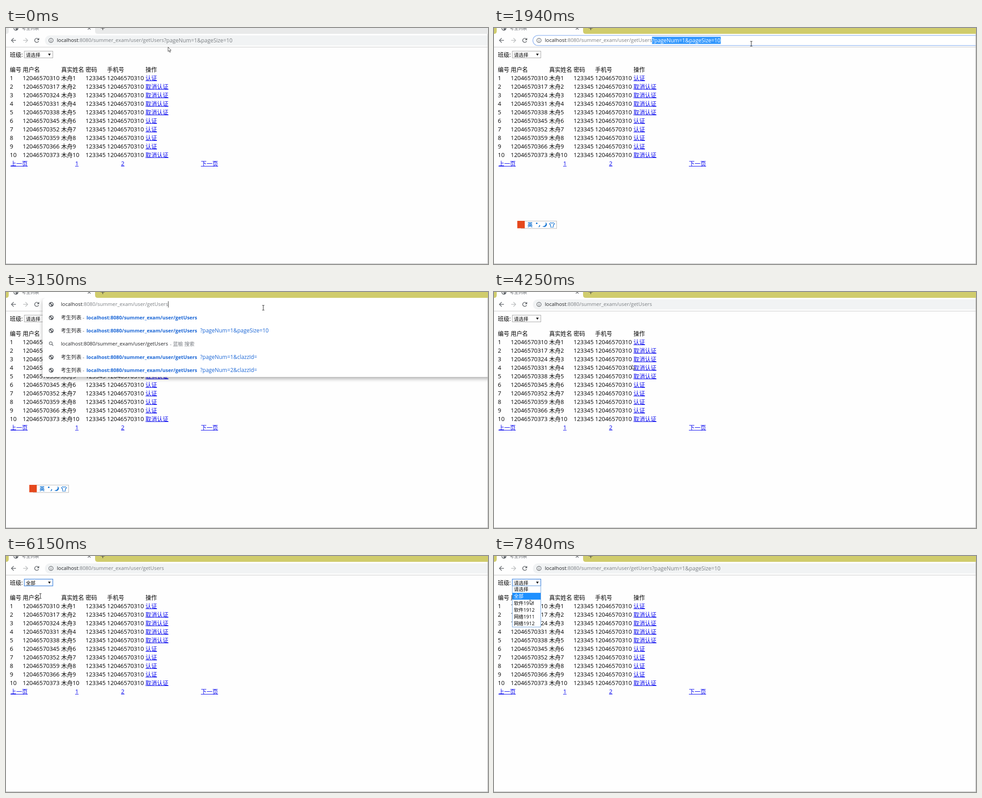
These frames come from a looping animation (1066 by 525 pixels, 8000 ms). An HTML page with a canvas:

```html
<!DOCTYPE html>
<html lang="zh-CN">
<head>
<meta charset="utf-8">
<title>考生列表</title>
<style>
html, body { margin: 0; width: 100%; height: 100%; overflow: hidden; background: #fefefe; }
canvas { display: block; }
</style>
</head>
<body>
<canvas id="stage" width="1066" height="525"></canvas>
<script>
const W = 1066, H = 525, LOOP = 8000;
const ctx = document.getElementById('stage').getContext('2d');
const GREY = '#5f6368', LINK = '#0000ee', BLUE = '#1a66d6', PAPER = '#fefefe';
const HOST = 'localhost', PATH = ':8080/summer_exam/user/getUsers';
const QUERY = '?pageNum=1&pageSize=10';
const OPTIONS = ['请选择', '全部', '软件1911', '软件1912', '网络1911', '网络1912'];
const CANCEL_ROWS = [2, 3, 4, 5, 10];

// Bursts of screen updates: start, end, number of steps.
const BURSTS = [[120, 820, 6], [1120, 1940, 7], [3030, 3150, 2], [3420, 3420, 1], [3980, 4940, 8],
  [5100, 5870, 6], [6150, 6300, 2], [6610, 7540, 8], [7690, 7840, 2]];

// Pointer path: time, x, y.
const POINTER = [[0, 358, 42], [120, 354, 38], [480, 323, 22], [820, 348, 21], [1120, 350, 24],
  [1257, 350, 24], [1800, 560, 35], [1940, 569, 35], [3420, 569, 35], [3980, 500, 85],
  [4117, 400, 140], [4254, 305, 162], [4391, 240, 173], [4800, 80, 85], [4940, 88, 60],
  [5100, 88, 60], [5870, 76, 89], [6300, 76, 89], [7400, 86, 61], [7540, 85, 62],
  [7690, 82, 79], [7840, 79, 97]];

function snap(t) {
  let held = 0;
  for (const [start, end, count] of BURSTS) {
    if (t < start) break;
    const step = (end - start) / (count - 1) || 1;
    held = Math.min(end, start + step * Math.floor((t - start) / step + 0.05));
  }
  return held;
}

function pointerAt(t) {
  const i = POINTER.findIndex(k => k[0] > t);
  if (i < 0) return POINTER[POINTER.length - 1].slice(1);
  const [a, b] = [POINTER[i - 1], POINTER[i]];
  const p = (t - a[0]) / (b[0] - a[0]);
  return [a[1] + (b[1] - a[1]) * p, a[2] + (b[2] - a[2]) * p];
}

function rect(x, y, w, h, color) {
  ctx.fillStyle = color;
  ctx.fillRect(x, y, w, h);
}

function circle(x, y, r, color) {
  ctx.fillStyle = color;
  ctx.beginPath();
  ctx.arc(x, y, r, 0, 7);
  ctx.fill();
}

function trace(points, closed) {
  ctx.beginPath();
  points.forEach(([x, y]) => ctx.lineTo(x, y));
  if (closed) ctx.closePath();
}

function line(points, color, width = 1) {
  ctx.strokeStyle = color;
  ctx.lineWidth = width;
  trace(points);
  ctx.stroke();
}

// Draws mixed text around the middle line y and returns its width.
function text(str, x, y, size = 12.7, color = '#000', weight = 400) {
  const start = x;
  ctx.fillStyle = color;
  for (const run of str.match(/[\u2e80-\u9fff]+|[^\u2e80-\u9fff]+/g)) {
    const cjk = run > '\u2e80';
    ctx.font = cjk ? `${weight} ${size}px "Noto Sans CJK SC", "Noto Sans CJK", sans-serif`
      : `${weight} ${size * 1.02}px "Open Sans", sans-serif`;
    ctx.fillText(run, x, y + size * 0.36);
    x += ctx.measureText(run).width;
  }
  return x - start;
}

function link(str, x, y) {
  const w = text(str, x, y, 12.7, LINK);
  rect(x, Math.round(y + 5.6), w, 1, LINK);
}

function globe(x, y) {
  circle(x, y, 5.3, GREY);
  ctx.fillStyle = '#fff';
  trace([[x - 4, y - 1], [x - 1, y], [x, y + 2], [x - 1, y + 4], [x - 3.5, y + 2]], true);
  ctx.fill();
  trace([[x, y - 3.8], [x + 3, y - 2.5], [x + 3.5, y + 1], [x + 1, y], [x + 1, y - 1.5], [x - 1, y - 2]], true);
  ctx.fill();
}

function tabStrip(active) {
  rect(0, 0, W, 13, active ? '#d0cc6c' : '#e9eaea');
  ctx.fillStyle = PAPER;
  ctx.beginPath();
  ctx.moveTo(0, 13);
  ctx.quadraticCurveTo(6, 13, 6, 7);
  ctx.lineTo(6, 0);
  ctx.lineTo(197, 0);
  ctx.lineTo(197, 7);
  ctx.quadraticCurveTo(197, 13, 203, 13);
  ctx.fill();
  globe(22, 0.5);
  text('考生列表', 35, 0.5, 9.5, GREY);
  line([[181, -2.5], [187, 3.5]], GREY, 1.2);
  line([[187, -2.5], [181, 3.5]], GREY, 1.2);
  line([[209.5, 0], [218.5, 0]], '#444', 1.4);
  line([[214, -5], [214, 4.5]], '#444', 1.4);
}

function arrowIcon(x, dir, color) {
  line([[x - 5 * dir, 27.5], [x + 5 * dir, 27.5]], color, 1.4);
  line([[x, 22.5], [x + 5 * dir, 27.5], [x, 32.5]], color, 1.4);
}

function toolbar() {
  rect(0, 13, W, 29, PAPER);
  rect(0, 42, W, 1, '#c9c9c9');
  arrowIcon(17, -1, GREY);
  arrowIcon(43, 1, '#babcbe');
  ctx.strokeStyle = GREY;
  ctx.lineWidth = 1.5;
  ctx.beginPath();
  ctx.arc(68, 27.5, 4.5, 0.4, 5.5);
  ctx.stroke();
  ctx.fillStyle = GREY;
  trace([[73.3, 22], [73.3, 27], [68.3, 27]], true);
  ctx.fill();
}

function address(x, y, query) {
  const w = text(HOST, x, y, 11.1, '#202124');
  text(PATH, x + w, y, 11.1, '#7b7f83');
  if (query) text(QUERY, x + 237, y, 11.7, '#7b7f83');
}

function pill({ focused, hovered, query, selectTo, caret }) {
  ctx.beginPath();
  ctx.roundRect(86, 16.5, 1020, 22.5, 11.25);
  ctx.fillStyle = focused ? '#fff' : hovered ? '#e8eaed' : '#f1f3f4';
  ctx.fill();
  if (focused) {
    ctx.strokeStyle = '#9dbdf2';
    ctx.lineWidth = 1.6;
    ctx.stroke();
  }
  ctx.strokeStyle = GREY;
  ctx.lineWidth = 1.2;
  ctx.beginPath();
  ctx.arc(99.5, 27.5, 4.7, 0, 7);
  ctx.stroke();
  rect(98.9, 27, 1.2, 3.2, GREY);
  rect(98.9, 24.7, 1.2, 1.2, GREY);
  address(112.5, 27.5, query);
  if (selectTo > 350) {
    ctx.save();
    ctx.beginPath();
    ctx.rect(349.5, 19.5, selectTo - 349.5, 16);
    ctx.clip();
    rect(349, 19, 153, 17, '#3297fd');
    text(QUERY, 349.5, 27.5, 11.7, '#fff');
    ctx.restore();
  }
  if (caret) rect(350, 20.5, 1, 14, '#333');
}

function page() {
  rect(0, 43, W, H - 43, PAPER);
  text('班级:', 8.5, 59.5);
  const columns = [8.5, 37, 122, 176, 223.5, 308.5];
  const row = (cells, y) => cells.forEach((cell, i) => text(cell, columns[i], y));
  row(['编号', '用户名', '真实姓名', '密码', '手机号', '操作'], 92.5);
  for (let n = 1; n <= 10; n++) {
    const y = 92.5 + 19 * n;
    row([`${n}`, `12046570${303 + n * 7}`, `木舟${n}`, '123345', '12046570310'], y);
    link(CANCEL_ROWS.includes(n) ? '取消认证' : '认证', columns[5], y);
  }
  link('上一页', 10, 301.5);
  link('1', 153, 301.5);
  link('2', 254.5, 301.5);
  link('下一页', 431, 301.5);
}

function select(value, focused) {
  rect(40, 51, 64, 16, '#fff');
  ctx.strokeStyle = focused ? '#4a8be0' : '#a3a3a3';
  ctx.lineWidth = focused ? 1.4 : 1;
  ctx.strokeRect(40.5, 51.5, 63, 15);
  text(value, 44, 60, 10.6);
  ctx.fillStyle = '#000';
  trace([[93.2, 57], [98.8, 57], [96, 61.8]], true);
  ctx.fill();
}

function optionList(active) {
  rect(40, 66, 64, 92.5, '#fff');
  OPTIONS.forEach((name, i) => {
    const y = 66.7 + 15.2 * i;
    if (i === active) rect(41, y, 62.5, 15.2, '#1e90ff');
    text(name, 44, y + 7.6, 10.6, i === active ? '#fff' : '#000');
  });
  ctx.strokeStyle = '#6fa3df';
  ctx.lineWidth = 1;
  ctx.strokeRect(40.5, 66.5, 63, 91.5);
}

function suggestions() {
  ctx.save();
  ctx.shadowColor = 'rgba(0,0,0,.32)';
  ctx.shadowBlur = 9;
  ctx.shadowOffsetY = 4;
  ctx.fillStyle = '#fff';
  ctx.beginPath();
  ctx.rect(0, 13, W, 200);
  ctx.clip();
  ctx.beginPath();
  ctx.roundRect(81, 13, 1020, 176, [7, 0, 0, 0]);
  ctx.fill();
  ctx.restore();

  globe(100, 27.5);
  address(121.5, 27.5, false);
  rect(358.5, 20.5, 1, 14, '#333');
  const rows = [[57, ''], [86, QUERY], [145, '?pageNum=1&clazzId='], [174, '?pageNum=2&clazzId=']];
  for (const [y, query] of rows) {
    globe(100, y);
    text('考生列表', 121.5, y, 11.3, '#202124');
    text('-', 169.5, y, 11.3, GREY);
    text(HOST + PATH, 178, y, 10.8, BLUE, 700);
    if (query) text(query, 429.5, y, 11.7, BLUE);
  }
  ctx.strokeStyle = GREY;
  ctx.lineWidth = 1.3;
  ctx.beginPath();
  ctx.arc(99, 114, 3.2, 0, 7);
  ctx.stroke();
  line([[101.3, 116.3], [104.5, 119.5]], GREY, 1.4);
  text(HOST + PATH, 121.5, 115.5, 11.1, '#202124');
  text('- 蓝榆 搜索', 362.5, 115.5, 11.2, '#777b80');
}

function inputBar() {
  const ink = '#1976d2';
  rect(60, 429, 79, 17.5, '#fff');
  ctx.strokeStyle = '#b5b5b5';
  ctx.lineWidth = 1;
  ctx.strokeRect(60.5, 429.5, 78, 16.5);
  rect(51.5, 429, 16.5, 16.5, '#e5481d');
  text('英', 74, 437.7, 11.5, ink, 700);
  circle(94.5, 434.5, 1.8, ink);
  line([[100.8, 438.5], [101, 440.5], [99, 442.8]], ink, 1.7);
  ctx.fillStyle = ink;
  ctx.beginPath();
  ctx.moveTo(114, 432);
  ctx.bezierCurveTo(121, 437, 114, 446.5, 107, 441);
  ctx.bezierCurveTo(113, 441.5, 115.5, 437, 114, 432);
  ctx.fill();
  ctx.strokeStyle = ink;
  ctx.lineWidth = 1.2;
  trace([[126, 433], [128.2, 434.5], [130.5, 433], [134, 435.5], [132.2, 438], [131.2, 437.5],
    [131.2, 443], [125.3, 443], [125.3, 437.5], [124.2, 438], [122.5, 435.5]], true);
  ctx.stroke();
}

function pointer(x, y, beam) {
  ctx.save();
  ctx.translate(x, y);
  if (beam) {
    line([[0, -5], [0, 5]], '#333', 1.1);
    line([[-2.5, -5.3], [2.5, -5.3]], '#333');
    line([[-2.5, 5.3], [2.5, 5.3]], '#333');
  } else {
    trace([[0.4, 0.4], [0.4, 10.2], [2.6, 8.2], [4.2, 12], [5.8, 11.3], [4.2, 7.7], [7.2, 7.7]], true);
    ctx.fillStyle = '#fff';
    ctx.fill();
    ctx.strokeStyle = '#333';
    ctx.lineWidth = 0.9;
    ctx.stroke();
  }
  ctx.restore();
}

function draw(time) {
  const t = snap(time);
  const within = (a, b) => t >= a && t < b;
  const [px, py] = pointerAt(t);
  const listOpen = within(5100, 6150) || t >= 7500;
  const chosen = within(6150, 6300);

  page();
  tabStrip(t >= 1200);
  toolbar();
  pill({
    focused: within(1200, 3420),
    hovered: within(1120, 1200),
    query: t < 3030 || t >= 6300,
    selectTo: within(1200, 3030) ? Math.min(px, 501.5) : 0,
    caret: within(3030, 3150)
  });
  select(chosen ? '全部' : '请选择', listOpen || chosen);
  if (listOpen) optionList(py > 82 ? 1 : 0);
  if (within(3150, 3420)) suggestions();
  if (within(1350, 3420)) inputBar();
  rect(W - 1, 13, 1, H - 13, '#b4b4b4');
  rect(0, H - 1, W, 1, '#b4b4b4');

  const overPill = px > 110 && py > 17 && py < 39;
  const overText = within(6150, 7000) && py > 83;
  pointer(px, py, overPill || overText);
}

function tick() {
  draw(performance.now() % LOOP);
  requestAnimationFrame(tick);
}
tick();
</script>
</body>
</html>
```
